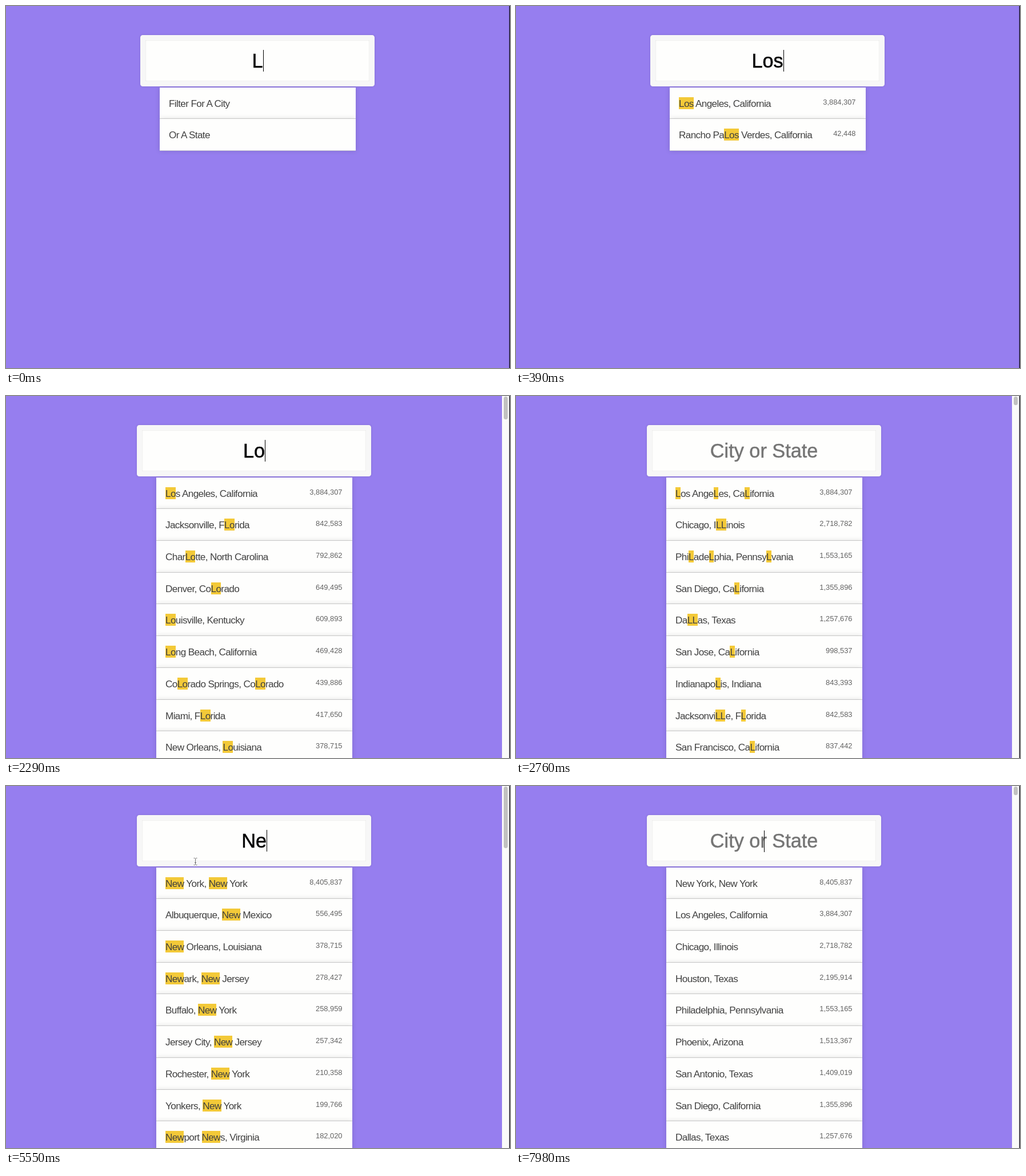
Animation, 882 px wide and 635 px high, one loop 8 s. Source, as an HTML page:

```html
<!DOCTYPE html>
<html lang="en">
<head>
<meta charset="utf-8">
<title>City search</title>
<style>
html, body { margin: 0; width: 100%; height: 100%; overflow: hidden; background: #967eef; }
body { position: relative; font-family: "Liberation Sans", Arial, sans-serif; }
#page { position: absolute; left: 0; top: 0; height: 635px; width: 880px; overflow: hidden; }
#field {
  position: absolute; z-index: 2; box-sizing: border-box;
  left: calc(50% - 205.2px); top: 51.4px; width: 410.6px; height: 90px;
  border: 9px solid #f7f7f7; border-radius: 4.3px; background: #fefefd;
  box-shadow: 0 0 4.3px rgba(0,0,0,.12), inset 0 0 2px rgba(0,0,0,.19);
  font-size: 34.29px; line-height: 72px; text-align: center; color: #000;
  -webkit-text-stroke: .5px;
}
#field span { position: relative; white-space: pre; }
#field .hint { color: #757575; }
#field i { position: absolute; left: 100%; top: 0; width: 1px; height: 38px; background: #000; }
#field .hint i { left: 50%; top: 1px; }
ul {
  position: absolute; left: calc(50% - 171px); top: 142.6px; width: 342.5px;
  margin: 0; padding: 0; list-style: none;
  font-size: 17.14px; letter-spacing: -.036em; color: #404040;
}
li {
  position: relative; display: flex; justify-content: space-between; box-sizing: border-box;
  height: 55.72px; padding: 0 17px 0 16px; white-space: pre; line-height: 56px;
  background: #fefefd; border-bottom: 1px solid #d4d4d4; box-shadow: 0 0 8.6px rgba(0,0,0,.14);
}
li b { font-weight: 400; padding-top: 1px; background: #f3c938; }
li em { font-style: normal; font-size: 12.86px; line-height: 52px; letter-spacing: 0; color: #626262; }
#bar { position: absolute; left: 868px; top: 0; width: 13px; height: 635px; background: #fafafa; }
#thumb { position: absolute; left: 3px; top: 1px; width: 7px; border-radius: 4px; background: #c1c1c1; }
#edge { position: absolute; left: 880px; top: 0; width: 2px; height: 635px;
  background: linear-gradient(90deg, rgba(0,0,0,.3) 50%, #131020 50%); }
#pointer { position: absolute; left: 0; top: 0; z-index: 3; }
</style>
</head>
<body>
<div id="page"><div id="field"></div><ul id="list"></ul></div>
<div id="bar"><div id="thumb"></div></div>
<div id="edge"></div>
<svg id="pointer" width="9" height="13" fill="none" stroke="#666" stroke-width=".9">
  <path d="M1.5 .5H3.5L4.5 1.5L5.5 .5H7.5M4.5 1V12M1.5 12.5H3.5L4.5 11.5L5.5 12.5H7.5M3 8.5H6"/>
</svg>
<script>
const cities = `New York, New York|8,405,837
Los Angeles, California|3,884,307
Chicago, Illinois|2,718,782
Houston, Texas|2,195,914
Philadelphia, Pennsylvania|1,553,165
Phoenix, Arizona|1,513,367
San Antonio, Texas|1,409,019
San Diego, California|1,355,896
Dallas, Texas|1,257,676
San Jose, California|998,537
Indianapolis, Indiana|843,393
Jacksonville, Florida|842,583
San Francisco, California|837,442
Charlotte, North Carolina|792,862
Memphis, Tennessee|653,450
Denver, Colorado|649,495
Nashville-Davidson, Tennessee|634,464
Louisville, Kentucky|609,893
Las Vegas, Nevada|603,488
Albuquerque, New Mexico|556,495
Long Beach, California|469,428
Colorado Springs, Colorado|439,886
Omaha, Nebraska|434,353
Miami, Florida|417,650
Minneapolis, Minnesota|400,070
New Orleans, Louisiana|378,715
Newark, New Jersey|278,427
Buffalo, New York|258,959
Jersey City, New Jersey|257,342
Rochester, New York|210,358
Yonkers, New York|199,766
Newport News, Virginia|182,020
Rancho Palos Verdes, California|42,448`.split("\n").map(line => line.split("|"));

const thumbs = { Lo: 40, Ne: 38, New: 108 };

// [time, typed text, filter (null = instructions), caret, pointer centre]
const steps = [
  [0, "L", null, 1],
  [150, "Lo", "L", 1],
  [230, "Lo", "Lo", 1],
  [310, "Los", "Lo", 1],
  [390, "Los", "Los", 1],
  [790, "Los", "Los", 0],
  [1290, "Los", "Los", 1],
  [1800, "Los", "Los", 0],
  [2180, "Lo", "Los", 0],
  [2290, "Lo", "Lo", 1],
  [2370, "L", "Lo", 1],
  [2570, "L", "L", 1],
  [2660, "", "L", 1],
  [2760, "", "L", 0],
  [4060, "New", "New", 1],
  [4560, "New", "New", 0],
  [4860, "New", "New", 0, [323, 154]],
  [4950, "New", "New", 0, [327, 142]],
  [5060, "New", "New", 1, [330, 134]],
  [5150, "New", "New", 1, [331, 132]],
  [5550, "Ne", "New", 1, [331, 132]],
  [5640, "Ne", "Ne", 1, [331, 132]],
  [5730, "N", "Ne", 1, [331, 132]],
  [5930, "N", "N", 1, [331, 132]],
  [6020, "", "N", 1, [331, 132]],
  [6420, "", "", 1, [331, 132]],
  [6510, "", "", 0, [331, 132]],
  [7000, "", "", 1, [331, 132]],
  [7100, "", "", 1],
  [7490, "", "", 0],
  [7980, "", "", 1]
];

const $ = id => document.getElementById(id);
const row = (name, count = "") => `<li><span>${name}</span><em>${count}</em></li>`;

function results(query) {
  if (query === null) return [row("Filter For A City"), row("Or A State")];
  const match = new RegExp(query, "gi");
  return cities.filter(([name]) => name.search(match) >= 0).slice(0, 9)
    .map(([name, count]) => row(query ? name.replace(match, `<b>${query}</b>`) : name, count));
}

function show([, text, query, caret, pointer]) {
  const rows = results(query), scrolls = rows.length > 2;
  $("list").innerHTML = rows.join("");
  $("page").style.width = scrolls ? "868px" : "880px";
  $("bar").style.display = scrolls ? "block" : "none";
  $("thumb").style.height = (thumbs[query] || 15) + "px";
  $("field").innerHTML =
    `<span class="${text ? "" : "hint"}">${text || "City or State"}${caret ? "<i></i>" : ""}</span>`;
  $("pointer").style.display = pointer ? "block" : "none";
  if (pointer) $("pointer").style.transform = `translate(${pointer[0] - 4}px, ${pointer[1] - 6}px)`;
}

let current;
function tick() {
  const time = performance.now() % 8000;
  const step = steps.findLast(s => s[0] <= time);
  if (step !== current) show(current = step);
  requestAnimationFrame(tick);
}
tick();
</script>
</body>
</html>
```
